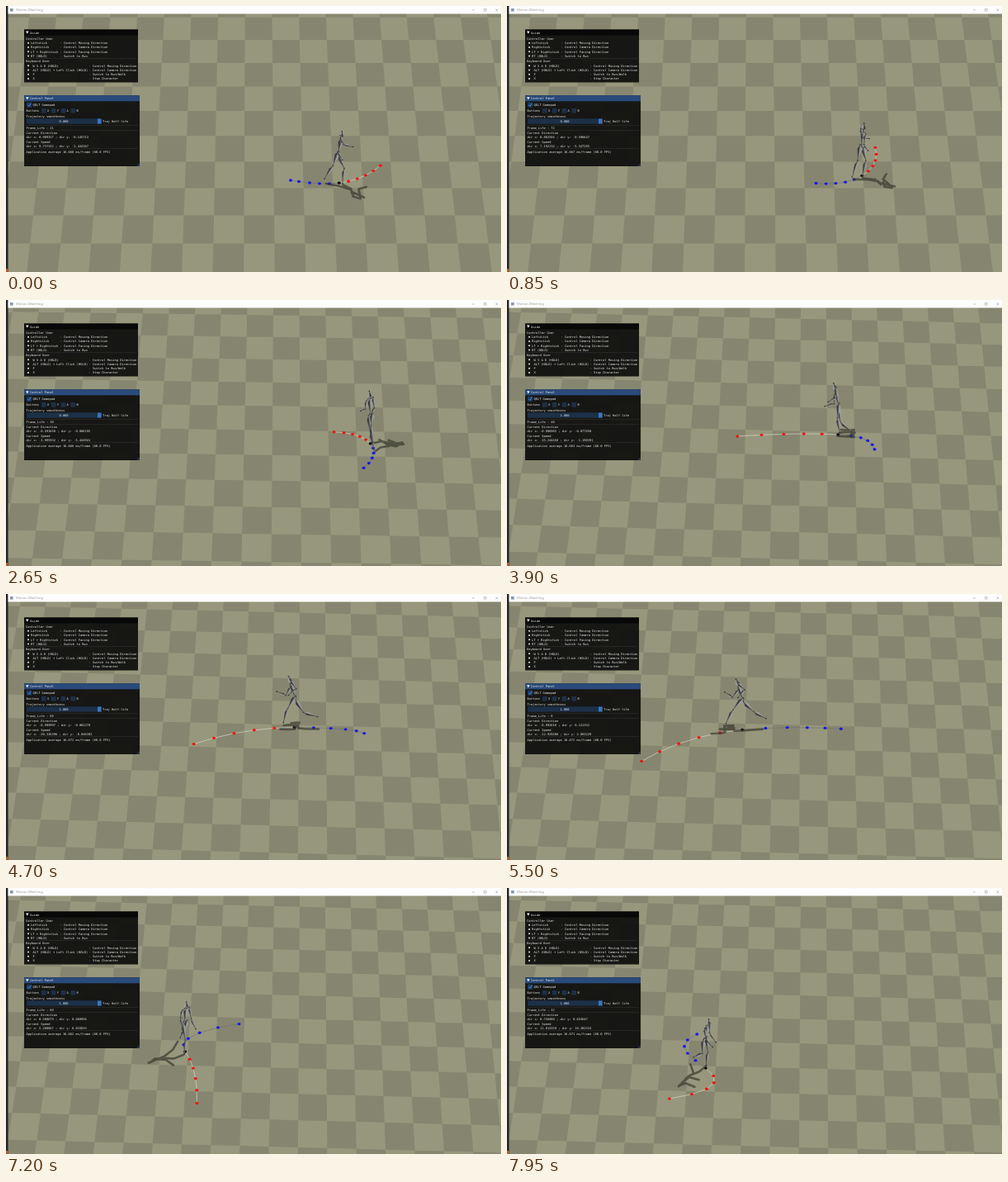
An HTML page with a canvas for the animation above (8000 ms loop, 600 by 322 pixels).

```html
<!DOCTYPE html>
<html lang="en">
<head>
<meta charset="utf-8">
<title>Motion-Matching</title>
<style>
  html, body { margin: 0; width: 600px; height: 322px; overflow: hidden; }
  canvas, svg { position: absolute; left: 0; top: 0; }
  text { font: 3.7px "DejaVu Sans Mono", monospace; fill: #e8e8e8; }
  .window-title { font: 4.1px "Open Sans", sans-serif; fill: #999; }
</style>
</head>
<body>
<canvas id="scene" width="600" height="322"></canvas>
<svg id="ui" width="600" height="322"></svg>
<script>
const LOOP = 8000;
const STEP = 1000 / 3; // time between trajectory dots
const TILT = 0.8;      // vertical foreshortening of the ground

// Ground position of the character, one point every two steps
const PATH = [
  [345, 211], [368, 214], [392, 215], [415, 212], [434, 203], [444, 191], [445, 179], [435, 169],
  [413, 164], [375, 162], [327, 162], [272, 166], [228, 178], [215, 193], [230, 210], [254, 227]
];

// Where the predicted trajectory ends: time and offset from the character
const GOALS = [
  [0, 50, -21], [850, 16, -34], [2650, -44, -14], [3900, -122, 2],
  [5500, -122, 38], [6400, 31, 42], [7100, 22, 66], [7950, -44, 37]
];

const LIFE_RESETS = [-355, 2010, 3230, 5360, 6195, 7410];

const mix = (a, b, u) => a + (b - a) * u;
const clamp = (v, lo, hi) => Math.min(hi, Math.max(lo, v));
const smooth = u => u * u * (3 - 2 * u);

function goalAt(t) {
  let i = 0;
  while (i < GOALS.length - 2 && t >= GOALS[i + 1][0]) i++;
  const [t0, x0, y0] = GOALS[i], [t1, x1, y1] = GOALS[i + 1];
  const u = clamp((t - t0) / (t1 - t0), 0, 1);
  return [mix(x0, x1, u), mix(y0, y1, u)];
}

// Catmull-Rom spline through PATH
function pathAt(t) {
  const last = PATH.length - 1;
  const k = clamp((t / STEP + 5) / 2, 0, last);
  const i = Math.min(Math.floor(k), last - 1), u = k - i;
  const [p, a, b, q] = [-1, 0, 1, 2].map(n => PATH[clamp(i + n, 0, last)]);
  return [0, 1].map(c => a[c] + u / 2 * (b[c] - p[c] +
    u * (2 * p[c] - 5 * a[c] + 4 * b[c] - q[c] + u * (3 * (a[c] - b[c]) + q[c] - p[c]))));
}

// Pixels per trajectory step
function velocityAt(t) {
  const a = pathAt(t - 40), b = pathAt(t + 40);
  return [0, 1].map(c => (b[c] - a[c]) * STEP / 80);
}

function headingAt(t) {
  const [vx, vy] = velocityAt(t), length = Math.hypot(vx, vy / TILT) || 1;
  return [vx / length, vy / TILT / length];
}

function futureDots(t) {
  const here = pathAt(t), velocity = velocityAt(t), goal = goalAt(t);
  return [1, 2, 3, 4, 5].map(s => [0, 1].map(c =>
    here[c] + velocity[c] * s + (goal[c] - velocity[c] * 5) * (s / 5) ** 2));
}

// Bones of a running figure; each joint is [forward, sideways, height]
function skeletonAt(t) {
  const run = clamp(Math.hypot(...velocityAt(t)) / 26, 0.3, 1);
  const stride = 0.25 + 0.5 * run;
  const body = (side, height) => [run * 0.35 * (height - 40), side, height];
  const extend = ([f, s, h], angle, length) =>
    [f + Math.sin(angle) * length, s, h - Math.cos(angle) * length];
  const hips = body(0, 36), neck = body(0, 54);
  const bones = [[neck, hips, 2.6], [neck, body(0, 62), 2.6]];
  for (const side of [-1, 1]) {
    const phase = 2 * Math.PI * (t - 5500) / 900 + side * Math.PI / 2;
    const swing = stride * Math.sin(phase);
    const hip = body(side * 3, 36), shoulder = body(side * 5, 53);
    const knee = extend(hip, swing, 18);
    const foot = extend(knee, swing - 0.25 - 0.8 * run * Math.max(0, Math.cos(phase)), 18);
    const elbow = extend(shoulder, -swing, 12);
    const hand = extend(elbow, -swing + 0.3 + 1.2 * run, 12);
    bones.push([hips, hip, 1.5], [hip, knee, 2.6], [knee, foot, 2.1]);
    bones.push([neck, shoulder, 1.2], [shoulder, elbow, 1.7], [elbow, hand, 1.4]);
  }
  return bones;
}

const g = document.getElementById("scene").getContext("2d");

function trace(points) {
  g.beginPath();
  points.forEach(p => g.lineTo(...p));
}

function polygon(points, fill) {
  trace(points);
  g.fillStyle = fill;
  g.fill();
}

function polyline(points, color, width) {
  trace(points);
  g.strokeStyle = color;
  g.lineWidth = width;
  g.stroke();
}

function drawDot([x, y], color, radius = 2) {
  g.beginPath();
  g.ellipse(x, y, radius, radius * 0.85, 0, 0, 7);
  g.fillStyle = color;
  g.fill();
}

function drawFloor(t) {
  const turn = smooth(clamp((t - 1750) / 1650, 0, 1));
  const angle = 0.028 * turn, size = mix(35, 33, turn);
  const c = Math.cos(angle), s = Math.sin(angle);
  const corner = (i, j) => {
    const u = i * size - 11, v = j * size - 3;
    const x = u * c - v * s, y = u * s + v * c;
    const scale = 1 / (1 - y * 0.0004);
    return [300 + x * scale, 160 + y * 0.88 * scale];
  };
  g.fillStyle = "#97977d";
  g.fillRect(0, 0, 600, 322);
  for (let i = -12; i < 12; i++)
    for (let j = -8; j < 8; j++)
      if (i + j & 1)
        polygon([corner(i, j), corner(i + 1, j), corner(i + 1, j + 1), corner(i, j + 1)], "#868670");
}

function drawBone([ax, ay], [bx, by], width) {
  const dx = bx - ax, dy = by - ay, length = Math.hypot(dx, dy) || 1;
  const nx = -dy / length * width, ny = dx / length * width;
  const mx = ax + dx * 0.28, my = ay + dy * 0.28;
  polygon([[ax, ay], [mx + nx, my + ny], [bx, by]], "#3a3b3e");
  polygon([[ax, ay], [mx - nx, my - ny], [bx, by]], "#a0a0a2");
  polyline([[ax, ay], [bx, by]], "#58595c", 0.8);
  drawDot([bx, by], "#333438", 0.9);
}

// The lamp hangs over the middle of the floor, so shadows point away from it
function drawCharacter(t) {
  const [px, py] = pathAt(t), [hx, hy] = headingAt(t);
  const lampX = (px - 335) * 0.0063, lampY = (py - 168) * 0.0063;
  const project = (f, s, h, sx, sy) =>
    [px + f * hx - s * hy + h * sx, py + TILT * (f * hy + s * hx) + h * sy];
  const shadow = joint => project(...joint, lampX, lampY);
  const solid = joint => project(...joint, 0, -1);
  const bones = skeletonAt(t);
  g.lineCap = g.lineJoin = "round";
  g.beginPath();
  bones.forEach(([a, b]) => { g.moveTo(...shadow(a)); g.lineTo(...shadow(b)); });
  g.strokeStyle = "rgba(52,52,42,.65)";
  g.lineWidth = 2.6;
  g.stroke();
  bones.forEach(([a, b, width]) => drawBone(solid(a), solid(b), width));
}

function drawScene(t) {
  const here = pathAt(t), future = futureDots(t);
  const past = [5, 4, 3, 2, 1].map(n => pathAt(t - n * STEP));
  drawFloor(t);
  polyline([...past, here], "rgba(105,108,110,.8)", 0.7);
  polyline([here, ...future], "rgba(215,215,200,.85)", 0.8);
  past.forEach(p => drawDot(p, "#1818f0"));
  drawDot(here, "#080808");
  future.forEach(p => drawDot(p, "#f01414"));
  drawCharacter(t);
}

const rect = (x, y, w, h, fill) => `<rect x="${x}" y="${y}" width="${w}" height="${h}" fill="${fill}"/>`;
const text = (x, y, label, extra = "") => `<text x="${x}" y="${y}" ${extra}>${label}</text>`;
const rule = (y, w) => rect(24, y, w, 0.4, "#3c3c42");
const arrow = y => `<path d="M24 ${y}h3.6l-1.8 3.2z" fill="#eee"/>`;
const panel = (y, w, h, bar, title) =>
  rect(22, y, w, h, "rgba(15,15,14,.94)") + rect(22, y, w, 7, bar) + arrow(y + 2) + text(29, y + 5, title);
const bullets = (y, keyX, actionX, rows) => rows.map(([key, action], i) =>
  `<circle cx="27" cy="${y + i * 5.25 - 1.3}" r="1" fill="#e8e8e8"/>` +
  text(keyX, y + i * 5.25, key) + text(actionX, y + i * 5.25, "- " + action)).join("");

const windowBar = rect(0, 0, 2.5, 322, "#24242b") + rect(2.5, 0, 597.5, 9.5, "#fdfdfe") +
  rect(5, 3, 3.6, 3.6, "#8799ab") + text(12, 6.4, "Motion-Matching", 'class="window-title"') +
  '<path d="M565 5h3M579.5 3.5h2.6v2.6h-2.6zM593.5 3.5l2.7 2.7m0-2.7l-2.7 2.7" fill="none" stroke="#888" stroke-width=".5"/>' +
  rect(0, 318, 2.5, 4, "#b65b28");

const guide = panel(28.5, 138, 64, "#080808", "Guide") +
  text(24, 40.7, "Controller User") +
  bullets(46, 30, 65.5, [
    ["Leftstick", "Control Moving Direction"],
    ["Rightstick", "Control Camera Direction"],
    ["LT + Rightstick", "Control Facing Direction"],
    ["RT (HOLD)", "Switch to Run"]
  ]) +
  rule(63.5, 134) + text(24, 68.3, "Keyboard User") +
  bullets(73.6, 32.5, 100.5, [
    ["W S A D (HOLD)", "Control Moving Direction"],
    ["ALT (HOLD) + Left Click (HOLD)", "Control Camera Direction"],
    ["F", "Switch to Run/Walk"],
    ["X", "Stop Character"]
  ]);

const buttons = ["X", "Y", "A", "B"].map((name, i) =>
  rect(43 + i * 11.8, 124, 5.6, 5.6, "#1d3049") + text(50 + i * 11.8, 128.3, name)).join("");

const controls = panel(108.3, 140, 85.7, "#294a7a", "Control Panel") +
  rect(25, 116.7, 6, 6, "#1d3a60") +
  '<path d="M26.3 119.8l1.5 1.6 2.5-3.6" fill="none" stroke="#4296fa" stroke-width=".9"/>' +
  text(32.5, 121.3, "QELT Gamepad") +
  text(24.5, 128.3, "Buttons") + buttons +
  text(24.5, 135, "Trajectory smoothness") +
  rect(25, 136.3, 91, 6.4, "#1d3049") + rect(111, 136.5, 4.5, 6, "#3b76bd") +
  text(70, 140.9, "", 'id="halfLife" text-anchor="middle"') + text(117, 140.9, "Traj Half-life") +
  rule(144, 136) + text(24.5, 148.6, "", 'id="life"') + rule(150, 136) +
  text(24.5, 155, "Current Direction") + text(24.5, 160.3, "", 'id="direction"') +
  text(24.5, 165.6, "Current Speed") + text(24.5, 170.9, "", 'id="speed"') +
  rule(172.5, 136) + text(24.5, 177.5, "", 'id="average"') +
  '<path d="M162 190v4h-4z" fill="#24364d"/>';

document.getElementById("ui").innerHTML = windowBar + guide + controls;

const show = (id, value) => { document.getElementById(id).textContent = value; };
const vector = ([x, y]) => `dir x: ${x.toFixed(6)} ; dir y: ${y.toFixed(6)}`;

function updatePanel(t) {
  const [vx, vy] = velocityAt(t);
  const reset = LIFE_RESETS.filter(r => r <= t).pop();
  const ms = 16.667 + 0.007 * Math.sin(t / 540 - Math.PI / 2);
  show("halfLife", t < 2900 ? "0.000" : "1.000");
  show("life", "Frame_Life : " + Math.floor((t - reset) * 0.06));
  show("direction", vector(headingAt(t)));
  show("speed", vector([vx / 1.2, vy / 1.2 / TILT]));
  show("average", `Application average ${ms.toFixed(3)} ms/frame (${(1000 / ms).toFixed(1)} FPS)`);
}

const start = performance.now();
function frame() {
  const elapsed = (performance.now() - start) % LOOP;
  const t = Math.floor(elapsed / 50) * 50;
  drawScene(t);
  updatePanel(t);
  requestAnimationFrame(frame);
}
frame();
</script>
</body>
</html>
```
